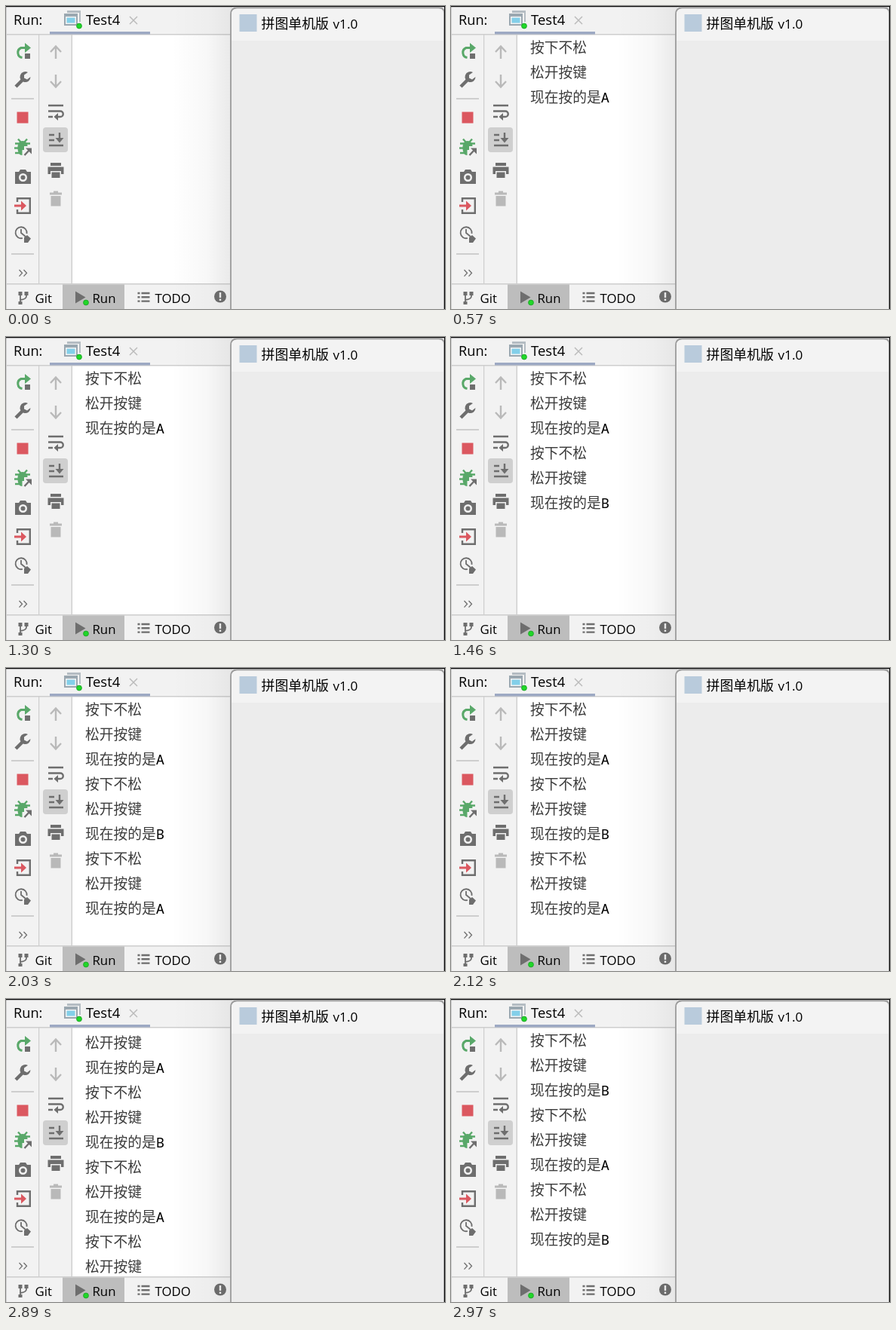
These frames come from a looping animation (582 px wide and 402 px high, 3010 ms). An HTML page:

```html
<!DOCTYPE html>
<html lang="zh-CN">
<head>
<meta charset="utf-8">
<title>Key listener console</title>
<style>
html, body { margin: 0; width: 100%; height: 100%; overflow: hidden; background: #f2f2f2; }
svg { position: absolute; left: 0; top: 0; display: block; }
.ui { font-family: "Open Sans", "Noto Sans", sans-serif; fill: #000; }
.console { position: absolute; left: 88px; top: 38px; width: 209px; height: 330px; overflow: hidden; background: #fff; }
.log {
  --line: 33px;
  margin: 0; padding-left: 17px; overflow: hidden; white-space: pre; color: #3c3c3c;
  font: 300 18.75px/var(--line) "Noto Sans Mono", "Noto Sans CJK SC", monospace;
  animation: print 3010ms step-end infinite;
}
.log b { font-weight: 500; color: #000; }
/* Each key press prints three lines; the view then follows the last line. */
@keyframes print {
  0% { height: 0; transform: none; }
  18.93% { height: calc(3 * var(--line)); transform: none; }
  45.84% { height: calc(6 * var(--line)); transform: none; }
  67.44% { height: calc(9 * var(--line)); transform: none; }
  96.01% { height: calc(11 * var(--line)); transform: translateY(-30px); }
  97.34%, 100% { height: calc(12 * var(--line)); transform: translateY(-99px); }
}
.gray { fill: #6e6e6e; }
.pale { fill: #b9b9b9; }
.green { fill: #59a869; }
.red { fill: #db5860; }
.line { fill: none; stroke: #6e6e6e; stroke-width: 2.4; }
.line.green { fill: none; stroke: #59a869; }
.line.pale { fill: none; stroke: #b9b9b9; }
.line.red { fill: none; stroke: #db5860; }
.thin { stroke-width: 1.8; }
.thick { stroke-width: 3; }
.rule { fill: #cecece; }
.dot { fill: #20d828; stroke: #20a82a; }
</style>
</head>
<body>
<div class="console"><div class="log">按下不松
松开按键
现在按的是<b>A</b>
按下不松
松开按键
现在按的是<b>B</b>
按下不松
松开按键
现在按的是<b>A</b>
按下不松
松开按键
现在按的是<b>B</b></div></div>

<svg class="ui" width="582" height="402" viewBox="0 0 582 402">
  <defs>
    <linearGradient id="shade">
      <stop offset="0" stop-opacity="0"/>
      <stop offset=".6" stop-opacity=".03"/>
      <stop offset="1" stop-opacity=".085"/>
    </linearGradient>
    <path id="up" class="line pale" d="M0 9V-7M-7 0L0-7.5 7 0"/>
    <path id="item" class="gray" d="M0 0H3V2.4H0ZM5 0H16V2.4H5Z"/>
  </defs>

  <!-- panels -->
  <path fill="#f2f2f2" d="M0 0H582V38H88V368H582V402H0Z"/>
  <path class="rule" d="M0 37H298V38.5H0ZM43 38H44.2V368H43ZM86.6 38H88V368H86.6ZM0 368H298V369.4H0ZM0 0H1V402H0Z"/>

  <!-- tab -->
  <text x="10" y="24.5" font-size="18.2">Run:</text>
  <path fill="#9da9c3" d="M58 34H191V37.5H58Z"/>
  <path fill="#b4bcc2" d="M81 6H99V21H97V9H81Z"/>
  <path fill="#9aa7b0" d="M77 10H95V26H77Z"/>
  <path fill="#f2f2f2" d="M79 14H93V24H79Z"/>
  <path fill="#83cfe9" d="M80.5 15.5H91.5V22.5H80.5Z"/>
  <circle class="dot" cx="97" cy="26.5" r="3.4"/>
  <text x="106" y="24.7" font-size="18.5">Test4</text>
  <path stroke="#bcbcbc" stroke-width="1.5" d="M164 14L174 24M174 14L164 24"/>

  <!-- first tool column -->
  <path class="line green thick" d="M21.5 68.5A6.8 6.8 0 0 1 20 55.5H26"/>
  <path class="green" d="M25 49L33 55.5 25 62Z"/>
  <path class="gray" d="M25 63H32V70H25Z"/>
  <path class="line" style="stroke-width:4.4" d="M13 107L24 96"/>
  <path class="gray" d="M29 88A7 7 0 1 0 32.5 94L28 97.5 24 95.5V91.5Z"/>
  <path class="rule" d="M7 122H37V124H7ZM7 328H37V330H7Z"/>
  <path class="red" d="M14.500 140.500H29.500V155.500H14.500Z"/>

  <path class="line green" d="M16 176.500L20 181M28 176.500L24 181M12 182.500H32M11 188.500H22M12 195H20"/>
  <path class="green" d="M22 179C27 179 28.500 183 28.500 186H24V191H21.500V198C17 198 15.500 193 15.500 188 15.500 183 17 179 22 179Z"/>
  <path class="line" d="M24.500 198L31 191"/>
  <path class="gray" d="M26 188.500H34V196.500Z"/>

  <path class="gray" fill-rule="evenodd" d="M12 220H17L19 217H26L28 220H33V236H12ZM22.500 222A5.500 5.500 0 1 0 22.500 233 5.500 5.500 0 1 0 22.500 222Z"/>
  <circle class="gray" cx="22.500" cy="227.500" r="3"/>

  <path class="line" d="M15 260V255.200H31.800V274.800H15V270"/>
  <path class="line red thick" d="M11 265H22"/>
  <path class="red" d="M20 258.500L27 265 20 271.500Z"/>

  <path class="line thin" d="M22 308A7.500 7.500 0 1 1 27.500 302M20 296V301L26 306"/>
  <path class="gray" d="M24 314V307L28 304 33 308.500 29 314Z"/>
  <path class="line" style="stroke-width:1.3" d="M17.500 350L21.500 354.300 17.500 358.600M23.500 350L27.500 354.300 23.500 358.600"/>

  <!-- second tool column -->
  <use href="#up" x="66" y="61"/>
  <use href="#up" transform="translate(66 100) scale(1 -1)"/>
  <path class="line" d="M56 132H76M56 139.500H72A3.700 3.700 0 0 1 72 147H67M56 147H62"/>
  <path class="gray" d="M69 142V152L63.500 147Z"/>
  <rect x="49" y="161" width="33" height="33" rx="4" fill="#cfcfcf"/>
  <path class="line" d="M57 171H64M57 178H64M57 185H76M71 168V178"/>
  <path class="gray" d="M65.500 175H76.500L71 181.500Z"/>
  <path class="gray" d="M59 208H73V212H59ZM55.500 213.500H76.500V223H73V219H59V223H55.500ZM60.500 220.500H71.500V228H60.500Z"/>
  <path class="pale" d="M63 245.500H69V247.500H74V250.500H58V247.500H63ZM59.500 252H72.500V265.500H59.500Z"/>

  <!-- bottom bar -->
  <path fill="#bdbdbd" d="M75 369.400H157V402H75Z"/>
  <g font-size="16.8">
    <text x="38.500" y="393.600">Git</text>
    <text x="114.500" y="393.600">Run</text>
    <text x="197.500" y="393.600">TODO</text>
  </g>
  <path class="line thin" d="M19 381V395M27 382V385Q27 389 19 390"/>
  <path class="gray" d="M16.500 379H21.500V384H16.500ZM24.500 379H29.500V384H24.500ZM16.500 392H21.500V396H16.500Z"/>
  <path class="gray" d="M92 378.500L105.500 386.500 92 394.500Z"/>
  <circle class="dot" cx="106" cy="393.500" r="3.400"/>
  <use href="#item" x="174.500" y="379.800"/>
  <use href="#item" x="174.500" y="385.100"/>
  <use href="#item" x="174.500" y="390.400"/>
  <circle class="gray" cx="284" cy="385.500" r="8"/>
  <path fill="#f2f2f2" d="M282.800 380H285.200V387H282.800ZM282.800 388.500H285.200V391H282.800Z"/>

  <!-- floating window -->
  <path fill="url(#shade)" d="M220 38H298V368H220Z"/>
  <path fill="url(#shade)" opacity=".6" d="M220 1H300V38H220ZM220 368H298V402H220Z"/>
  <path fill="#080808" d="M0 0H582V1.200H0Z"/>
  <path fill="#ececec" stroke="#9c9c9c" stroke-width="1.800" d="M298 404V11Q298 2.500 306.500 2.500H574Q581 2.500 581 9V404Z"/>
  <path fill="#f3f3f3" d="M299 46V11Q299 3.400 306.500 3.400H573Q580 3.400 580 10V46Z"/>
  <rect x="309.500" y="11" width="23" height="23" fill="#b9cbdc"/>
  <text x="338.500" y="30" font-size="17.900" style="font-family:'Noto Sans CJK SC',sans-serif">拼图单机版</text>
  <text x="433.500" y="29.700" font-size="17.200">v1.0</text>
  <path fill="#080808" d="M581 0H582V402H581Z"/>
</svg>
</body>
</html>
```
